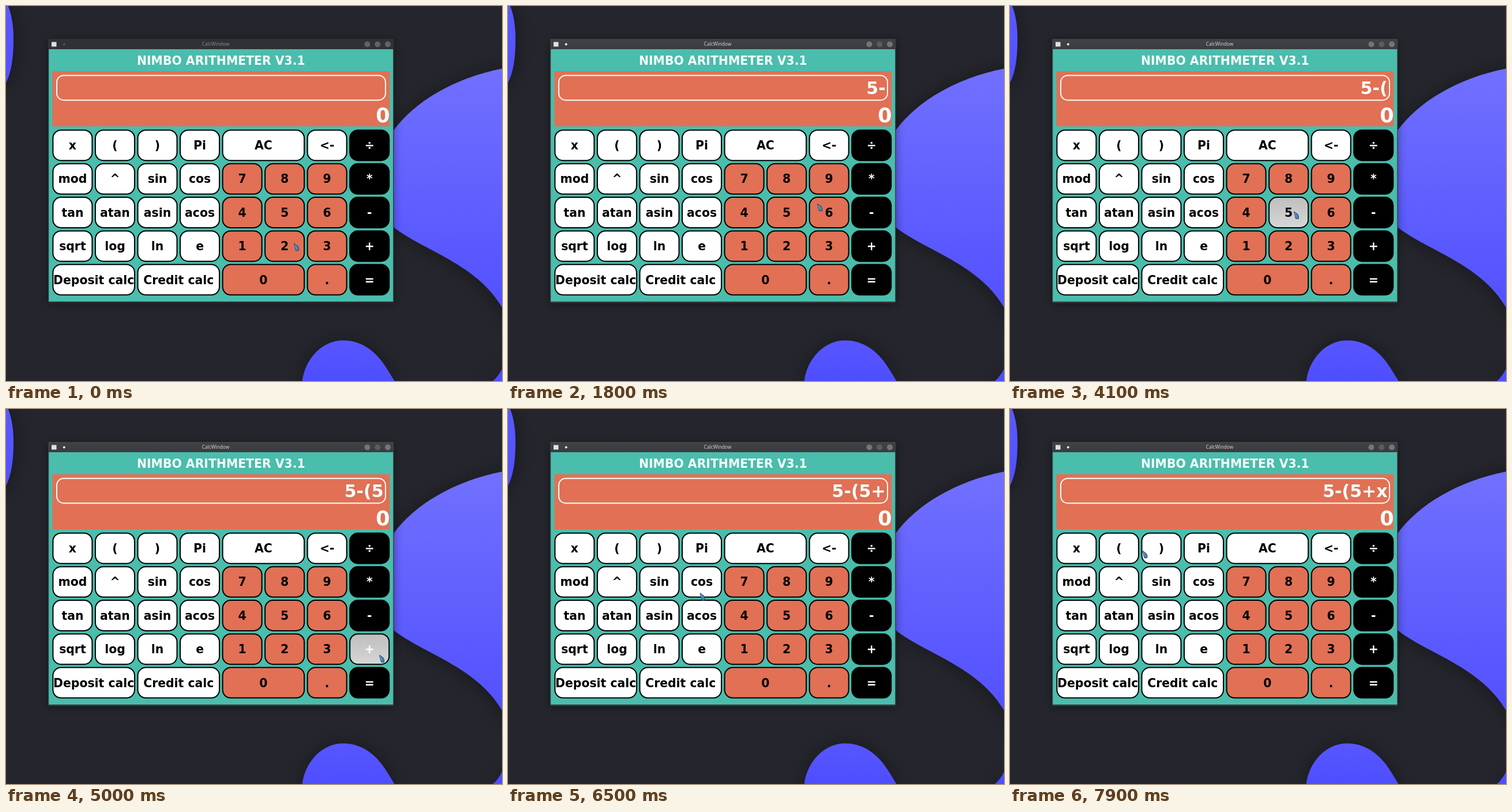
Animation, 860 px wide and 651 px high, one loop 8000 ms. Source, as an HTML page with a canvas:

```html
<!DOCTYPE html>
<html lang="en">
<head>
<meta charset="utf-8">
<title>Calculator</title>
<style>
html, body { margin: 0; width: 100%; height: 100%; overflow: hidden; background: #25252d; }
canvas { display: block; }
</style>
</head>
<body>
<canvas id="stage" width="860" height="651"></canvas>
<script>
const ctx = document.getElementById('stage').getContext('2d');
const LOOP = 8000, STEP = 100;
const TEAL = '#4abdac', ORANGE = '#e17055', MINT = '#f5fffa';
const BOLD = '"DejaVu Sans", sans-serif';

// Key grid
const GRID = { x: 80.4, y: 214.4, dx: 73.55, dy: 58.35, w: 70, h: 54.8 };
const WIDE = ['AC', '0', 'Deposit calc', 'Credit calc'];
const ROWS = [
  'x|(|)|Pi|AC|<-|÷',
  'mod|^|sin|cos|7|8|9|*',
  'tan|atan|asin|acos|4|5|6|-',
  'sqrt|log|ln|e|1|2|3|+',
  'Deposit calc|Credit calc|0|.|='
];

const keys = ROWS.flatMap((labels, row) => {
  let col = 0;
  return labels.split('|').map(label => {
    const extra = WIDE.includes(label) ? 1 : 0;
    const x = GRID.x + GRID.dx * col, y = GRID.y + GRID.dy * row;
    const w = GRID.w + GRID.dx * extra;
    col += 1 + extra;
    return {
      label, x, y, w, cx: x + w / 2, cy: y + GRID.h / 2,
      operator: col === 8, digit: /^[\d.]$/.test(label)
    };
  });
});
const keyOf = label => keys.find(k => k.label === label);

// The pointer travels from key to key; lean is the offset from the key's
// centre, power bends the speed (above 1 starts slowly, below 1 ends slowly)
const go = (label, from, to, { lean = [9, -2], power = 1 } = {}) => {
  const { cx, cy } = keyOf(label);
  return { x: cx + lean[0], y: cy + lean[1], start: from - STEP, span: to - from + STEP, power };
};
const trips = [
  go('2', 0, 0, { lean: [16, -5] }),
  go('5', 100, 400),
  go('-', 700, 1100),
  go('^', 1800, 1900, { power: 2.1 }),
  go('(', 2200, 2400),
  go('2', 3200, 3300, { lean: [37, 40], power: 0.32 }),
  go('5', 3500, 3800),
  go('+', 4500, 5000, { lean: [17, 10] }),
  go('cos', 5400, 6300, { lean: [21, 25] }),
  go('x', 6500, 7000, { lean: [13, 28], power: 1.25 }),
  go('x', 7300, 7500, { lean: [4, 11] }),
  go(')', 7800, 7900, { lean: [-33, 4] })
];

// A key is held for a moment, then its character is typed
const tap = (label, typed, hold = STEP) => ({ label, typed, down: typed - hold });
const taps = [
  tap('5', 500), tap('-', 1300), tap('(', 2800, 0),
  tap('5', 4200), tap('+', 5100), tap('x', 7600)
];

function pointerAt(t) {
  let { x, y } = trips[0];
  for (const trip of trips) {
    const p = Math.min(1, Math.max(0, (t - trip.start) / trip.span)) ** trip.power;
    x += (trip.x - x) * p;
    y += (trip.y - y) * p;
  }
  return [x, y];
}

function rect(x, y, w, h, fill) {
  ctx.fillStyle = fill;
  ctx.fillRect(x, y, w, h);
}

function disc(x, y, r, fill) {
  ctx.fillStyle = fill;
  ctx.beginPath();
  ctx.arc(x, y, r, 0, Math.PI * 2);
  ctx.fill();
}

// Rounded box whose 2px border lies inside the given bounds
function box(x, y, w, h, r, fill, border) {
  ctx.beginPath();
  ctx.roundRect(x + 1, y + 1, w - 2, h - 2, r);
  ctx.fillStyle = fill;
  ctx.fill();
  ctx.strokeStyle = border;
  ctx.lineWidth = 2;
  ctx.stroke();
}

function text(str, x, y, font, fill, align = 'center') {
  ctx.font = font;
  ctx.fillStyle = fill;
  ctx.textAlign = align;
  ctx.fillText(str, x, y);
}

function vertical(y0, y1, a, b) {
  const g = ctx.createLinearGradient(0, y0, 0, y1);
  g.addColorStop(0, a);
  g.addColorStop(1, b);
  return g;
}

function shadowed(blur, alpha, paint) {
  ctx.save();
  ctx.shadowColor = `rgba(0,0,0,${alpha})`;
  ctx.shadowBlur = blur;
  ctx.shadowOffsetY = 2;
  paint();
  ctx.restore();
}

function blob(path, fill) {
  shadowed(36, 0.4, () => {
    ctx.fillStyle = fill;
    ctx.fill(new Path2D(path));
  });
}

function drawBackdrop() {
  rect(0, 0, 860, 651, '#25252d');
  blob('M-30 -40 C5 -20 13 20 13 58 C13 95 8 122 -4 140 L-30 140Z',
    vertical(0, 132, '#5a59ff', '#5150ff'));
  blob('M900 103 C800 112 714 158 672 216 C620 290 630 350 672 384 ' +
    'C724 425 818 448 861 525 L900 570Z',
    vertical(109, 524, '#7170ff', '#5251ff'));
  blob('M513 660 C514 618 545 580.5 584 580.5 C625 580.5 649 609 665 637 L679 660Z',
    vertical(581, 651, '#5756ff', '#4f4eff'));
  blob('M838 655 C848 650 855 640 861 628 L890 655Z', '#4f4eff');
}

function drawFrame(active) {
  shadowed(16, active ? 0.42 : 0.36, () => {
    ctx.beginPath();
    ctx.roundRect(73, 57, 599.5, 458.5, 2);
    ctx.fillStyle = active ? '#3b3c41' : '#303136';
    ctx.fill();
  });
  rect(74, 57.5, 597, 17.5, active ? vertical(57, 75, '#424347', '#3a3b40') : '#303136');
  rect(79, 62.5, 8.5, 8, '#e0e0e0');
  disc(100.8, 66.5, 1.9, active ? '#f2f2f2' : '#56575b');
  text('CalcWindow', 363.5, 68.6, '8.3px "Noto Sans", sans-serif', active ? '#d0d1d3' : '#85868a');
  for (let i = 0; i < 3; i++) {
    disc(626.4 + 17.8 * i, 66.5, 5, !active ? '#626265' : i === 1 ? '#5c5c5f' : '#757577');
  }
}

function drawDisplay(entry) {
  rect(74.2, 75, 597, 438, TEAL);
  text('NIMBO ARITHMETER V3.1', 372.8, 101.5, `bold 20.4px ${BOLD}`, MINT);
  rect(GRID.x, 113.3, 584.8, 95.7, ORANGE);
  box(87, 119.4, 572, 45, 12, ORANGE, MINT);
  text(entry, 654.6, 152.6, `bold 30px ${BOLD}`, MINT, 'right');
  text('0', 665.6, 202, `bold 35px ${BOLD}`, MINT, 'right');
}

function drawKey({ label, x, y, w, cx, cy, operator, digit }, held) {
  const fill = held ? vertical(y, y + GRID.h, '#bebebe', '#d7d7d7')
    : operator ? '#000' : digit ? ORANGE : '#fff';
  box(x, y, w, GRID.h, 14, fill, '#000');
  text(label, cx, cy + 7.3, `bold 20.4px ${BOLD}`, operator ? '#fff' : '#000');
}

function drawPointer(x, y) {
  ctx.save();
  ctx.translate(x, y);
  ctx.lineJoin = 'round';
  ctx.fillStyle = '#3f82bf';
  ctx.strokeStyle = '#233a5e';
  ctx.lineWidth = 0.9;
  const body = new Path2D('M0.4 0.4 L6.8 5 L8.6 9.5 L7.8 13 L3.2 12.4Z');
  ctx.fill(body);
  ctx.stroke(body);
  ctx.strokeStyle = '#7db4de';
  ctx.stroke(new Path2D('M2 3 L4 10'));
  ctx.restore();
}

function draw(t) {
  const entry = taps.filter(k => t >= k.typed).map(k => k.label).join('');
  const held = taps.find(k => t >= k.down && t < k.typed);
  drawBackdrop();
  drawFrame(t >= taps[0].down);
  drawDisplay(entry);
  for (const key of keys) drawKey(key, held && held.label === key.label);
  drawPointer(...pointerAt(t));
}

let shown = -1;
function tick(now) {
  const t = Math.floor((now % LOOP) / STEP) * STEP;
  if (t !== shown) draw(shown = t);
  requestAnimationFrame(tick);
}
draw(0);
requestAnimationFrame(tick);
</script>
</body>
</html>
```
